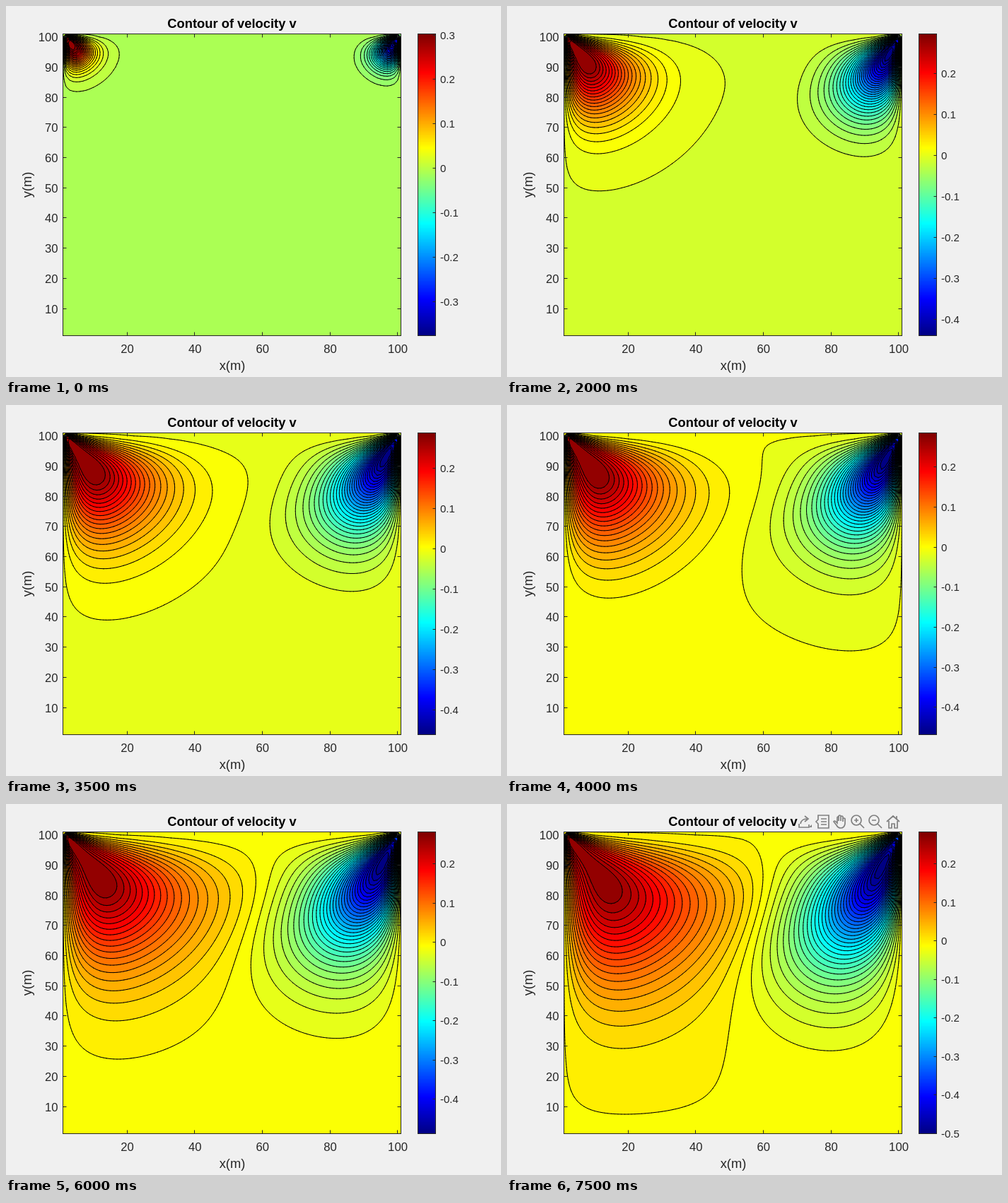
Animation of 700x525 px, one loop 8 s. Source, as an HTML page with a canvas:

```html
<!DOCTYPE html>
<html lang="en">
<head>
<meta charset="utf-8">
<title>Contour of velocity v</title>
<style>
html, body { margin: 0; width: 100%; height: 100%; overflow: hidden; background: #f0f0f0; }
canvas { display: block; width: 700px; height: 525px; }
</style>
</head>
<body>
<canvas id="stage" width="700" height="525"></canvas>
<script>
const ctx = document.getElementById('stage').getContext('2d');
const LOOP = 8000, HOLD = 500, LAST = 15;
const FONT = '"Liberation Sans", Arial, sans-serif';
const INK = '#262626';

// ---- Lid-driven cavity in cell units ----
// Stream function and vorticity are relaxed side by side, at the same rate.
const N = 100, M = N + 1, REYNOLDS = 100;
const NU = N / REYNOLDS, DT = 0.2, MAX_STEPS = 6000;
let psi = new Float64Array(M * M), nextPsi = new Float64Array(M * M);
let vort = new Float64Array(M * M), nextVort = new Float64Array(M * M);
const fields = [];
let steps = 0;

function setWalls() {
  for (let i = 1; i < N; i++) {
    vort[i] = -2 * psi[M + i];
    vort[N * M + i] = -2 * (psi[(N - 1) * M + i] + 1);
    vort[i * M] = -2 * psi[i * M + 1];
    vort[i * M + N] = -2 * psi[i * M + N - 1];
  }
}

function step() {
  setWalls();
  for (let j = 1; j < N; j++) {
    for (let p = j * M + 1, end = j * M + N; p < end; p++) {
      const e = vort[p + 1], w = vort[p - 1], n = vort[p + M], s = vort[p - M];
      const pe = psi[p + 1], pw = psi[p - 1], pn = psi[p + M], ps = psi[p - M];
      const u = (pn - ps) / 2, v = (pw - pe) / 2;
      const spread = NU * (e + w + n + s - 4 * vort[p]);
      nextVort[p] = vort[p] + DT * (spread - (u * (e - w) + v * (n - s)) / 2);
      nextPsi[p] = psi[p] + DT * NU * (pe + pw + pn + ps - 4 * psi[p] + vort[p]);
    }
  }
  [vort, nextVort] = [nextVort, vort];
  [psi, nextPsi] = [nextPsi, psi];
  steps++;
}

// How far below the lid the rising flow has reached
function depth() {
  const limit = 0.015;
  let below = 0;
  for (let j = 1; j < N; j++) {
    let top = 0;
    for (let i = 1; i < 50; i++) {
      const p = j * M + i;
      top = Math.max(top, (psi[p - 1] - psi[p + 1]) / 2);
    }
    if (top > limit) return N - j + (top - limit) / (top - below);
    below = top;
  }
  return 0;
}

function velocity() {
  const v = new Float64Array(M * M);
  for (let j = 1; j < N; j++) {
    for (let i = 1; i < N; i++) {
      const p = j * M + i;
      v[p] = (psi[p - 1] - psi[p + 1]) / 2;
    }
  }
  return v;
}

// Diffusion: squared depth grows evenly from picture to picture
function fieldAt(index) {
  while (fields.length <= index) {
    step();
    if (steps > MAX_STEPS || depth() >= Math.sqrt(265 + 335 * fields.length)) fields.push(velocity());
  }
  return fields[index];
}

// ---- Colour scale ----
const BANDS = 50;
const KEYS = [0, 2, 5, 8, 10, 12, 15];
const LOW = [-0.376, -0.4225, -0.449, -0.468, -0.4794, -0.488, -0.5002];
const HIGH = [0.3024, 0.303, 0.292, 0.2853, 0.2838, 0.282, 0.2826];

function blend(values, x) {
  let k = 0;
  while (k < KEYS.length - 2 && x > KEYS[k + 1]) k++;
  const f = (x - KEYS[k]) / (KEYS[k + 1] - KEYS[k]);
  return values[k] + f * (values[k + 1] - values[k]);
}

function jet(index) {
  const r = index + 1;
  const ramp = (from, to) => Math.round(255 * Math.max(0, Math.min(1, (r - from) / 64, (to - r) / 64)));
  return [ramp(96, 288), ramp(32, 224), ramp(-32, 160)];
}

const bandColors = Array.from({ length: BANDS }, (_, k) => jet(Math.floor(k / BANDS * 256)));

// ---- Plot ----
const BOX = { x: 80.5, y: 39.5, w: 478, h: 427 };
const BAR = { x: 582.5, y: 39.5, w: 25, h: 427 };
const xOf = g => BOX.x + g * BOX.w / N;
const yOf = g => BOX.y + BOX.h - g * BOX.h / N;

function fillBands(v, low, gap) {
  const img = ctx.createImageData(BOX.w, BOX.h);
  let q = 0;
  for (let py = 0; py < BOX.h; py++) {
    const gy = N - (py + 0.5) * N / BOX.h;
    const j = Math.min(N - 1, Math.floor(gy)), fy = gy - j;
    for (let px = 0; px < BOX.w; px++) {
      const gx = (px + 0.5) * N / BOX.w;
      const i = Math.min(N - 1, Math.floor(gx)), fx = gx - i, p = j * M + i;
      const a = v[p] + fx * (v[p + 1] - v[p]);
      const b = v[p + M] + fx * (v[p + M + 1] - v[p + M]);
      const k = Math.floor((a + fy * (b - a) - low) / gap);
      const c = bandColors[Math.max(0, Math.min(BANDS - 1, k))];
      img.data[q++] = c[0];
      img.data[q++] = c[1];
      img.data[q++] = c[2];
      img.data[q++] = 255;
    }
  }
  ctx.putImageData(img, 81, 40);
}

function strokeLevels(v, low, gap) {
  ctx.save();
  ctx.beginPath();
  ctx.rect(BOX.x, BOX.y, BOX.w, BOX.h);
  ctx.clip();
  ctx.beginPath();
  for (let j = 0; j < N; j++) {
    for (let i = 0; i < N; i++) {
      const p = j * M + i;
      const corners = [[i, j, v[p]], [i + 1, j, v[p + 1]], [i + 1, j + 1, v[p + M + 1]], [i, j + 1, v[p + M]]];
      const min = Math.min(corners[0][2], corners[1][2], corners[2][2], corners[3][2]);
      const max = Math.max(corners[0][2], corners[1][2], corners[2][2], corners[3][2]);
      const end = Math.min(BANDS - 1, Math.floor((max - low) / gap));
      for (let k = Math.max(1, Math.ceil((min - low) / gap)); k <= end; k++) {
        const level = low + k * gap;
        let count = 0;
        for (let e = 0; e < 4; e++) {
          const a = corners[e], b = corners[(e + 1) % 4];
          if (a[2] < level === b[2] < level) continue;
          const f = (level - a[2]) / (b[2] - a[2]);
          const x = xOf(a[0] + f * (b[0] - a[0])), y = yOf(a[1] + f * (b[1] - a[1]));
          if (count++ % 2) ctx.lineTo(x, y);
          else ctx.moveTo(x, y);
        }
      }
    }
  }
  ctx.strokeStyle = '#000';
  ctx.lineWidth = 1;
  ctx.lineCap = 'round';
  ctx.stroke();
  ctx.restore();
}

function line(x1, y1, x2, y2) {
  ctx.beginPath();
  ctx.moveTo(x1, y1);
  ctx.lineTo(x2, y2);
  ctx.stroke();
}

function text(str, x, y, size, align = 'center', color = INK, weight = '') {
  ctx.font = `${weight} ${size}px ${FONT}`;
  ctx.textAlign = align;
  ctx.fillStyle = color;
  ctx.fillText(str, x, y);
}

const snap = a => Math.floor(a) + 0.5;

function drawAxes() {
  const right = BOX.x + BOX.w, bottom = BOX.y + BOX.h;
  ctx.strokeStyle = INK;
  ctx.lineWidth = 1;
  ctx.strokeRect(BOX.x, BOX.y, BOX.w, BOX.h);
  for (let n = 20; n <= 100; n += 20) {
    const x = snap(xOf(n - 1));
    line(x, bottom, x, bottom - 5);
    line(x, BOX.y, x, BOX.y + 5);
    text(n, xOf(n - 1) + 0.3, 491, 16.67);
  }
  for (let n = 10; n <= 100; n += 10) {
    const y = snap(yOf(n - 1));
    line(BOX.x, y, BOX.x + 5, y);
    line(right, y, right - 5, y);
    text(n, 73.5, y + 6, 16.67, 'right');
  }
  text('x(m)', 320, 515, 18.33);
  ctx.save();
  ctx.translate(36, 253);
  ctx.rotate(-Math.PI / 2);
  text('y(m)', 0, 0, 18.33);
  ctx.restore();
  text('Contour of velocity v', 319.5, 31, 18.33, 'center', '#000', 'bold');
}

function drawBar(low, high) {
  for (let y = 0; y < BAR.h; y++) {
    const c = jet(Math.floor((1 - (y + 0.5) / BAR.h) * 256));
    ctx.fillStyle = `rgb(${c})`;
    ctx.fillRect(582, 40 + y, 26, 1);
  }
  ctx.strokeStyle = INK;
  ctx.lineWidth = 1;
  ctx.strokeRect(BAR.x, BAR.y, BAR.w, BAR.h);
  for (let n = Math.ceil(low * 10); n <= Math.floor(high * 10); n++) {
    const y = BAR.y + BAR.h * (high - n / 10) / (high - low);
    line(BAR.x + BAR.w, snap(y), BAR.x + BAR.w - 4, snap(y));
    text(n ? (n / 10).toFixed(1) : '0', 614, y + 5.5, 15, 'left');
  }
}

// ---- Tool icons at the upper right ----
const ICONS = [
  [421, 'M-8 3V8H6V4M-6 3C-5 -2 -1 -4 3 -4M0 -8L5 -4L0 0'],
  [447, 'M-7 -9H8V9H-7V3L-10 0L-7 -3ZM-3 -4H5M-3 0H5M-3 4H5'],
  [471, 'M-4 2V-6Q-3 -8 -2 -6V-1V-8Q-.5 -10 1 -8V-1V-7Q2.5 -9 4 -7V0V-4Q6 -6 7 -4V3Q6 9 1 9Q-3 9 -5 5L-9 0Q-8 -2 -6 0Z'],
  [496, 'M5 -2A7 7 0 1 1 -9 -2A7 7 0 1 1 5 -2M3 3L9 9M-5 -2H1M-2 -5V1'],
  [521, 'M5 -2A7 7 0 1 1 -9 -2A7 7 0 1 1 5 -2M3 3L9 9M-5 -2H1'],
  [546, 'M-9 0L0 -8L9 0M-6 -1V9H-2V3H2V9H6V-1M5 -4V-8']
];

function drawTools() {
  ctx.strokeStyle = '#808080';
  ctx.fillStyle = '#808080';
  ctx.lineWidth = 1.7;
  for (const [x, d] of ICONS) {
    ctx.save();
    ctx.translate(x, 25);
    ctx.stroke(new Path2D(d));
    ctx.restore();
  }
  ctx.fill(new Path2D('M431 29V33H427Z'));
}

function draw(index) {
  const v = fieldAt(index);
  const low = blend(LOW, index), high = blend(HIGH, index);
  const gap = (high - low) / BANDS;
  ctx.fillStyle = '#f0f0f0';
  ctx.fillRect(0, 0, 700, 525);
  fillBands(v, low, gap);
  strokeLevels(v, low, gap);
  drawAxes();
  drawBar(low, high);
  if (index === LAST) drawTools();
}

let start = null, shown = -1;

function tick(now) {
  if (start === null) start = now;
  const index = Math.min(LAST, Math.floor(Math.max(0, now - start) % LOOP / HOLD));
  if (index !== shown) {
    shown = index;
    draw(index);
  }
  requestAnimationFrame(tick);
}

requestAnimationFrame(tick);
</script>
</body>
</html>
```
